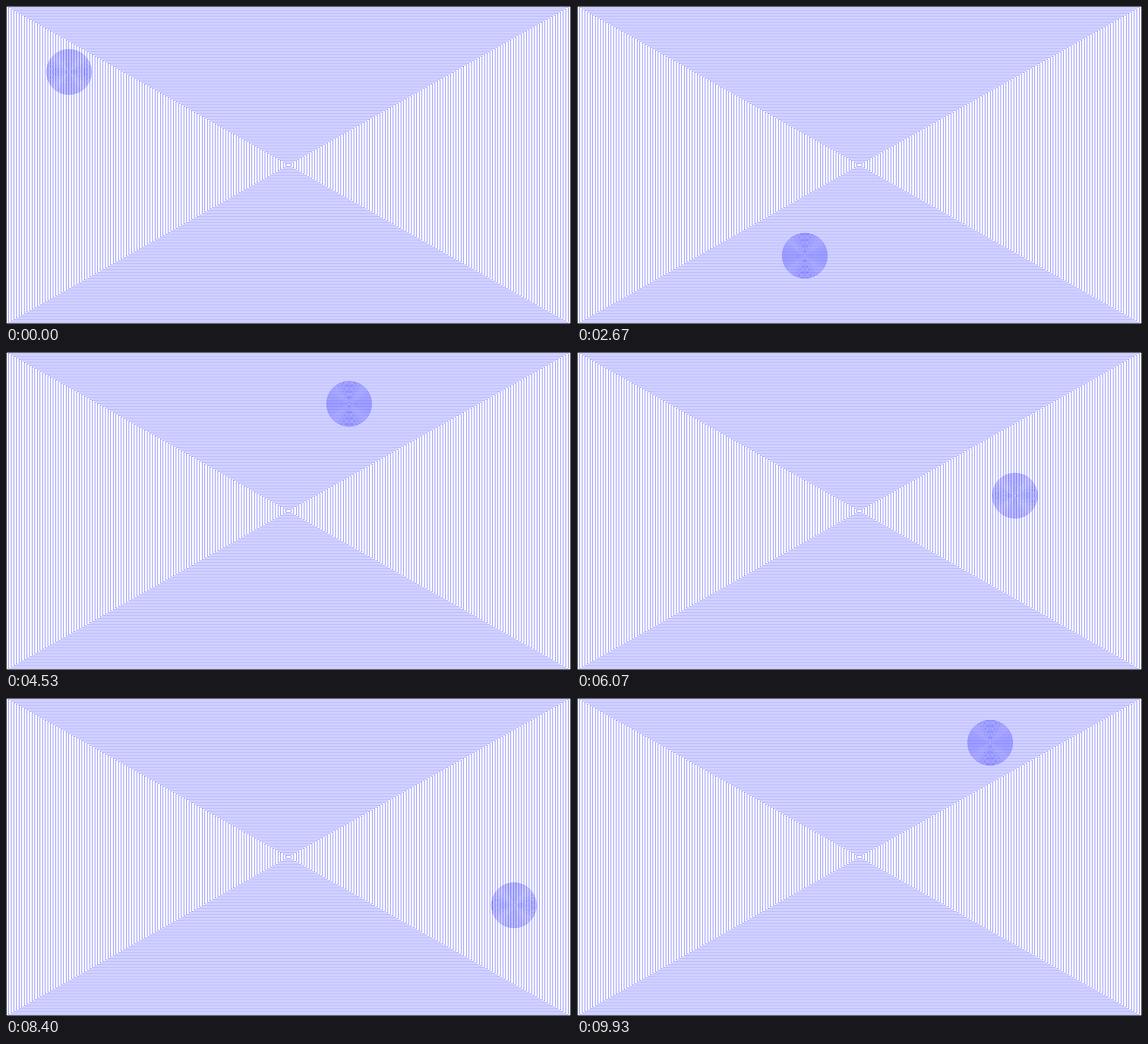
An HTML page with a canvas for the animation above (9990 ms loop, 960x540 px).

```html
<!DOCTYPE html>
<html>
<head>
<meta charset="utf-8">
<style>
html, body { margin: 0; width: 100%; height: 100%; overflow: hidden; background: #fff; }
canvas { display: block; }
</style>
</head>
<body>
<canvas id="stage" width="960" height="540"></canvas>
<script>
const W = 960, H = 540, RECTS = 108, LOOP = 9990;
const ctx = document.getElementById("stage").getContext("2d");

function drawRects() {
  ctx.lineWidth = 0.5;
  ctx.strokeStyle = "#00f";
  for (let i = 1; i < RECTS; i++) {
    const x = i * W / RECTS / 2, y = i * H / RECTS / 2;
    ctx.strokeRect(x, y, W - 2 * x, H - 2 * y);
  }
  ctx.lineWidth = 2;
  ctx.strokeStyle = "#000";
  ctx.strokeRect(0, 0, W, H);
}

function drawDisc(x, y) {
  ctx.lineWidth = 0.5;
  ctx.strokeStyle = "#00f";
  for (let r = 2; r < 40; r += 2) {
    ctx.beginPath();
    ctx.arc(x, y, r, 0, 2 * Math.PI);
    ctx.stroke();
  }
}

// Bounces between 0 and span, in steps.
function bounce(step, span) {
  const phase = ((step % (2 * span)) + 2 * span) % (2 * span);
  return span - Math.abs(span - phase);
}

// 15 ticks per second, each starting on a whole hundredth of a second.
function tickAt(ms) {
  const hundredths = Math.floor(ms % LOOP / 10 + 0.01);
  return Math.floor((hundredths + 0.5) * 0.15);
}

function frame(now) {
  const tick = tickAt(now);
  ctx.clearRect(0, 0, W, H);
  drawRects();
  drawDisc(926 - 7 * Math.abs(tick - 117), 28 + 12 * bounce(tick - 73, 40));
  requestAnimationFrame(frame);
}
frame(0);
</script>
</body>
</html>
```
